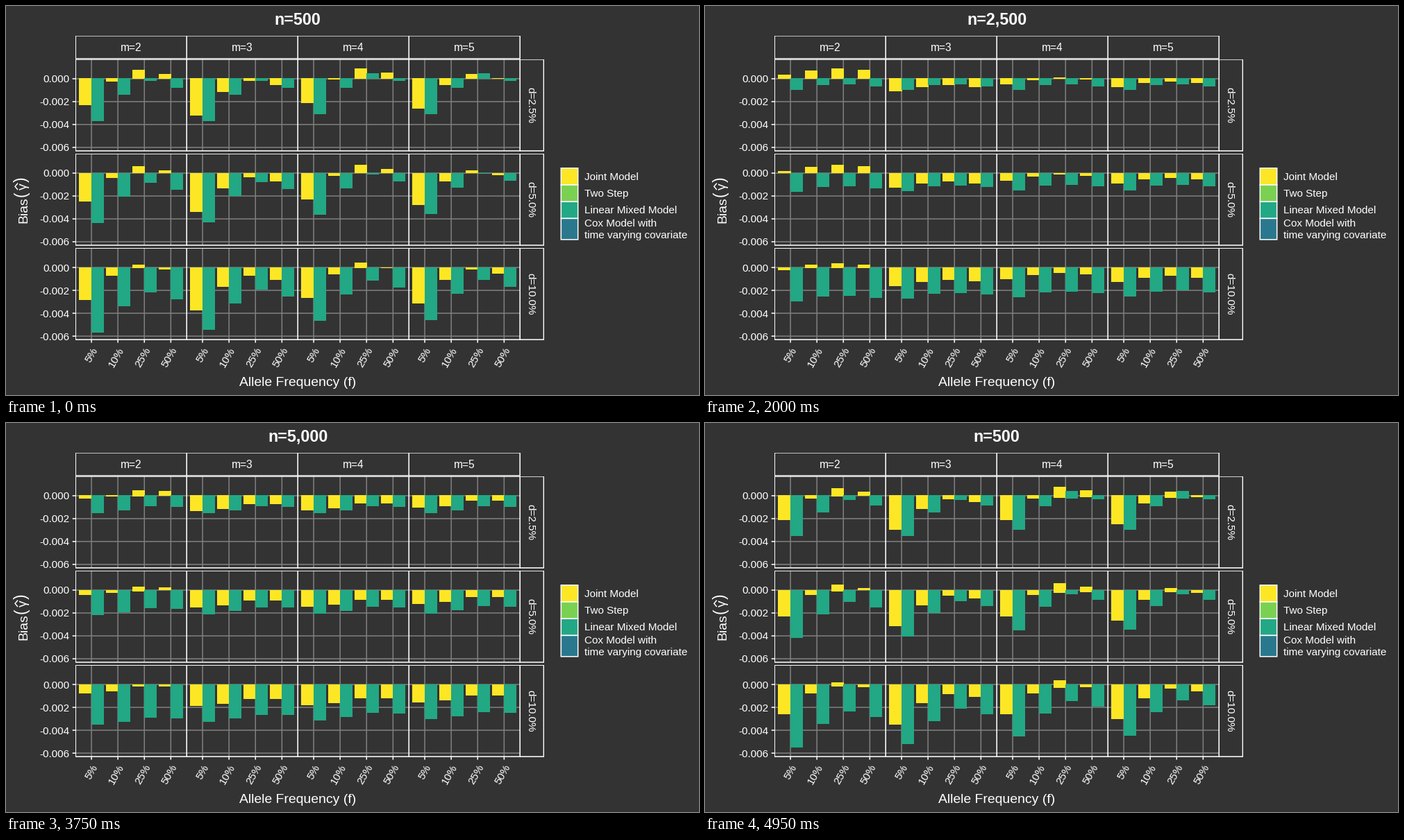
Recreate the animation shown at these times as a matplotlib script. Size 998 by 561 pixels, loop 5000 ms.

```python
import numpy as np
import matplotlib.pyplot as plt
from matplotlib.animation import FuncAnimation
from matplotlib.patches import Rectangle

W, H, DPI = 998, 561, 64
PT = 72 / DPI                      # points per pixel
HOLD, STEPS = 15, 6                # frames at rest, steps per move
CYCLE = HOLD + STEPS - 1

BG, GRID, INK = "#333333", "#7F7F7F", "white"
JOINT, TWO_STEP, MIXED, COX = "#FDE725", "#7AD151", "#22A884", "#2A788E"

plt.rcParams["font.family"] = "Liberation Sans"

MS = np.arange(2, 6)
DS = np.array([2.5, 5, 10])
FREQS = [5, 10, 25, 50]


def bias(joint_f, joint_m, mixed_f, lift):
    """Bias in thousandths, indexed by d, m, frequency and series.

    Effects of frequency and m add up (units of 1e-5); bias falls
    in proportion to d, for the mixed model faster at small m.
    """
    d = (DS - 2.5)[:, None, None]
    m = MS[:, None]
    joint = np.array(joint_f) + np.array(joint_m)[:, None] - 7 * d
    mixed = np.array(mixed_f) + lift * np.sign(m - 3.5) - (16 + 21 / m) * d
    return np.stack([joint, mixed], axis=-1) / 100


small = (-337, -107, 14, -46)      # mixed model at the two smallest n
states = {
    "n=500": bias((-254, -47, 46, 9), (28, -64, 44, -7), small, 32),
    "n=1,000": bias((-263, -101, 46, 0), (36, -87, 9, 41), small, 32),
    "n=2,500": bias((-48, -10, 5, -8), (82, -60, 2, -24), (-97, -54, -47, -62), 0),
    "n=5,000": bias((-80, -75, -27, -34), (79, -43, -30, -7), (-133, -117, -80, -91), 0),
    "n=10,000": bias((-167, -90, -72, -32), (52, -14, -26, -13), (-233, -158, -129, -100), 0),
}
titles = list(states)
values = [v.ravel() for v in states.values()]

# Panel layout in pixels
LEFT, PANEL_W = 100.2, 160.0
TOP, PANEL_H, PITCH = 77.0, 131.9, 136.1
ZERO, SCALE = 104.9, 16.5          # first zero line, pixels per 0.001
UNIT = PANEL_W / 4.2               # width of one category
BAR_W = 0.45 * UNIT
RIGHT = LEFT + 4 * PANEL_W
STROKE = 1.55


def centre(col, cat):
    return LEFT + col * PANEL_W + (0.6 + cat) * UNIT


def zero(row):
    return ZERO + row * PITCH


fig = plt.figure(figsize=(W / DPI, H / DPI), dpi=DPI, facecolor=BG)
ax = fig.add_axes([0, 0, 1, 1])
ax.set(xlim=(0, W), ylim=(H, 0))
ax.axis("off")


def line(xs, ys, color=INK, width=STROKE, z=1):
    ax.plot(xs, ys, color=color, lw=width * PT, zorder=z, snap=False,
            solid_capstyle="butt")


def frame(x0, y0, x1, y1):
    """Outline clipped to its box plus one pixel right and below."""
    w, h = x1 - x0, y1 - y0
    box = ax.add_patch(Rectangle((x0, y0), w, h, fill=False, ec=INK,
                                 lw=STROKE * PT, zorder=4, snap=False))
    box.set_clip_path(Rectangle((x0, y0), w + 1, h + 1, transform=ax.transData))


def text(x, y, s, size=15.2, ha="center", rot=0, **kw):
    return ax.text(x, y, s, size=size * PT, color=INK, ha=ha, va="baseline",
                   rotation=rot, rotation_mode="anchor", zorder=5, **kw)


# Panels, grid, axes and strips
for row, d in enumerate(DS):
    y0 = TOP + row * PITCH
    y1 = y0 + PANEL_H
    for k in range(4):
        y = zero(row) + 2 * k * SCALE
        line([LEFT, RIGHT], [y, y], GRID)
        line([LEFT - 4.5, LEFT], [y, y])
        text(92, y + 5.4, f"{'-' if k else ''}0.00{2 * k}", ha="right")
    for col in range(4):
        x0 = LEFT + col * PANEL_W
        for cat in range(4):
            x = centre(col, cat)
            line([x, x], [y0, y1], GRID)
        frame(x0, y0, x0 + PANEL_W, y1)
    frame(RIGHT, y0, 774.4, y1)
    text(751.7, (y0 + y1) / 2, f"d={d:.1f}%", rot=-90)

for col, m in enumerate(MS):
    x0 = LEFT + col * PANEL_W
    frame(x0, 42.9, x0 + PANEL_W, 76)
    text(x0 + PANEL_W / 2, 65, f"m={m}", 15.5)
    for cat, freq in enumerate(FREQS):
        x = centre(col, cat)
        line([x, x], [y1, y1 + 4.5])
        text(x + 9.4, 495.8, f"{freq}%", ha="right", rot=60)

# Titles
title = text(420.3, 26.7, titles[0], 23.3, weight="bold")
text(420.3, 547.8, "Allele Frequency (f)", 19.4)
text(30, 313, "Bias", 19.4, ha="left", rot=90)
text(29, 275, "(", 23, ha="left", rot=90)
text(29, 253.5, ")", 23, ha="left", rot=90)
text(30, 260.3, "γ", 19.4, rot=90)
line([17, 13, 17], [265, 260.3, 255.6], width=1.5, z=5)

# Legend
edges = [233.8, 258, 282.2, 306.4, 336.8]
for top, bottom, color in zip(edges, edges[1:], [JOINT, TWO_STEP, MIXED, COX]):
    ax.add_patch(Rectangle((799.3, top), 24.4, bottom - top, fc=color, ec=INK,
                           lw=STROKE * PT, snap=False))
for y, label in [(251, "Joint Model"), (275.2, "Two Step"),
                 (299.4, "Linear Mixed Model"), (318.4, "Cox Model with"),
                 (334.8, "time varying covariate")]:
    text(833.5, y, label, ha="left")

# Bars
bars = []
for row, col, cat, series in np.ndindex(3, 4, 4, 2):
    x = centre(col, cat) + (series - 1) * BAR_W
    bar = Rectangle((x, zero(row)), BAR_W, 0, fc=(JOINT, MIXED)[series],
                    lw=0, zorder=3, snap=False, antialiased=False)
    bars.append((ax.add_patch(bar), zero(row)))


def update(i):
    now, step = divmod(i, CYCLE)
    nxt = (now + 1) % len(titles)
    t = max(0, step - HOLD + 1) / STEPS
    a, b = values[now], values[nxt]
    # Both ends of every bar move on their own
    low = np.minimum(a, 0) * (1 - t) + np.minimum(b, 0) * t
    high = np.maximum(a, 0) * (1 - t) + np.maximum(b, 0) * t
    for (bar, base), lo, hi in zip(bars, low, high):
        bar.set_y(base - hi * SCALE)
        bar.set_height((hi - lo) * SCALE)
    title.set_text(titles[nxt if t >= 0.5 else now])
    return [bar for bar, _ in bars] + [title]


anim = FuncAnimation(fig, update, frames=CYCLE * len(titles), interval=50,
                     repeat=True, repeat_delay=0, blit=False)
plt.show()
```
